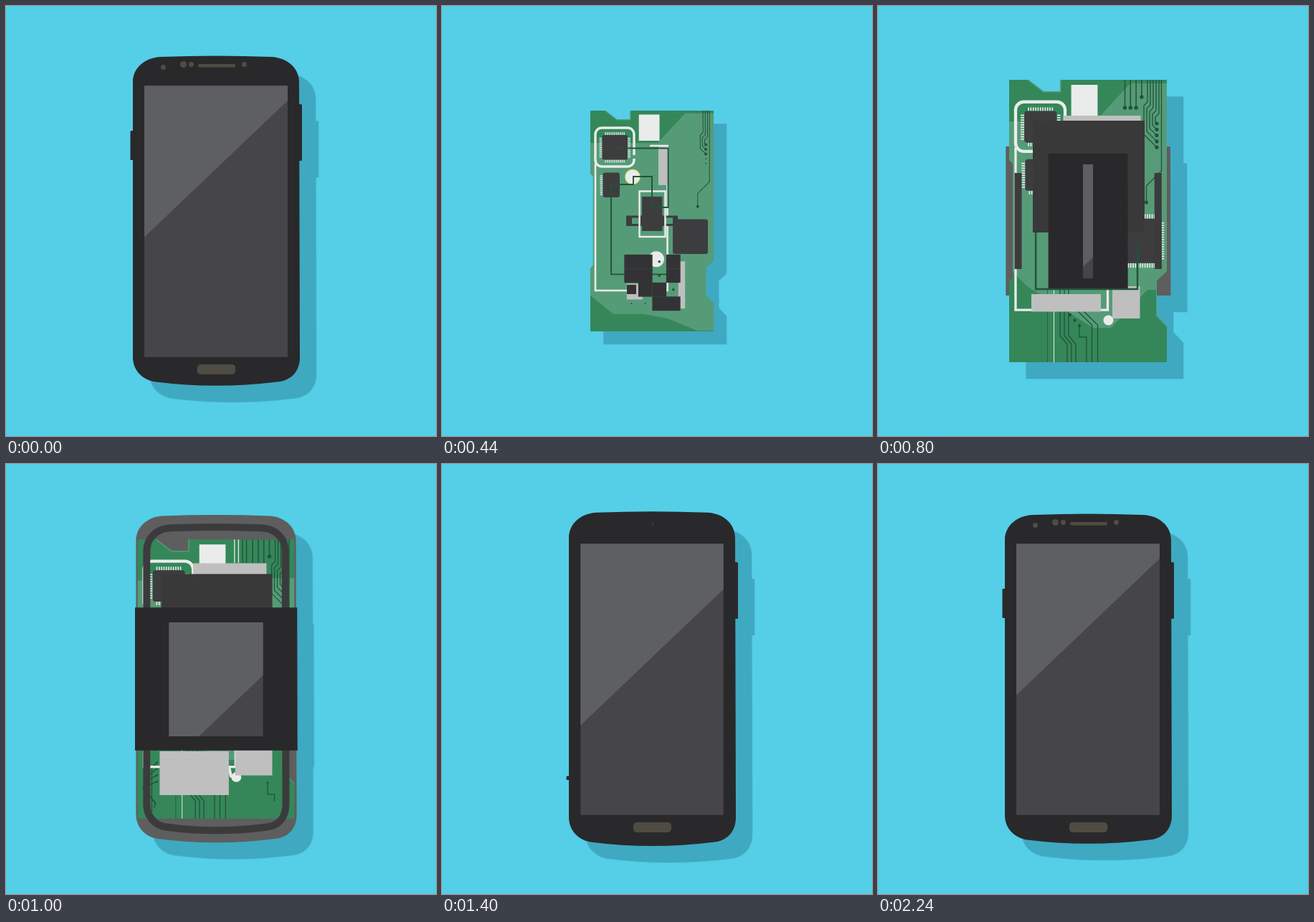
These frames come from a looping animation (600 px wide and 600 px high, 2.28 s). An HTML page with a canvas:

```html
<!DOCTYPE html>
<html lang="en">
<head>
<meta charset="utf-8">
<title>Phone assembly</title>
<style>
html, body { margin: 0; width: 100%; height: 100%; overflow: hidden; background: #54cfe7; }
canvas { display: block; width: 600px; height: 600px; }
</style>
</head>
<body>
<canvas id="stage" width="600" height="600"></canvas>
<script>
const LOOP = 2280, STEP = 40, CX = 293, CY = 300, SMALL = 0.782;
const C = {
  sky: '#54cfe7', shadow: '#3fa9c1', body: '#29292b', glass: '#46464a', shine: '#5e5f61',
  detail: '#4f4c44', shell: '#5e5e5e', ring: '#3b3b3d', board: '#358759', light: '#569b77',
  trace: '#23523a', white: '#e9eceb', grey: '#bfbfbf', chip: '#3d3d3f', tile: '#333335', box: '#393939'
};
const BODY = new Path2D('M177 106C177 86 194 72 216 71Q293 68 370 71C392 72 409 86 409 106' +
  'L410 490C410 510 398 523 378 524.5Q293 535 209 524.5C190 522 177 508 177 490Z');
const BOARD = new Path2D('M183 103h27l21 16h23V103H403V370l-14 13v49l14 15v50H183V385l5-6V220l-5-5Z');
// '#' is a dark tile, 'o' a solder dot
const TILES = ['##o#', '##o#', '.##o', 'oo##'];

const view = document.getElementById('stage').getContext('2d');
const layer = document.createElement('canvas');
layer.width = layer.height = 600;
const g = layer.getContext('2d');

// Timing
const mix = (a, b, u) => a + (b - a) * u;
const span = (t, a, b) => Math.min(1, Math.max(0, (t - a) / (b - a)));
const ease = (t, a, b) => { const u = span(t, a, b); return u * u * (3 - 2 * u); };
const out = (t, a, b, power = 3) => 1 - (1 - span(t, a, b)) ** power;
const back = (t, a, b) => { const v = span(t, a, b) - 1; return 1 + 1.75 * v ** 3 + 0.75 * v * v; };
const spring = (t, a, period) => {
  const s = Math.max(0, t - a) / period;
  return 1 - Math.exp(-2 * s) * Math.cos(2 * Math.PI * s);
};

// Drawing
function rect(color, x, y, w, h, r = 0) {
  if (w <= 0 || h <= 0) return;
  g.fillStyle = color;
  g.beginPath();
  g.roundRect(x, y, w, h, Math.min(r, w / 2, h / 2));
  g.fill();
}
const block = (color, cx, cy, w, h, r) => rect(color, cx - w / 2, cy - h / 2, w, h, r);
function frame(color, width, x, y, w, h, r) {
  g.strokeStyle = color;
  g.lineWidth = width;
  g.beginPath();
  g.roundRect(x, y, w, h, r);
  g.stroke();
}
function dot(color, x, y, r) {
  g.fillStyle = color;
  g.beginPath();
  g.arc(x, y, Math.max(0, r), 0, 7);
  g.fill();
}
function fill(color, path) {
  g.fillStyle = color;
  g.fill(path);
}
function line(color, width, d, length = 2000) {
  if (length <= 0) return;
  g.strokeStyle = color;
  g.lineWidth = width;
  g.setLineDash([length, 2000]);
  g.stroke(new Path2D(d));
  g.setLineDash([]);
}
function scaled(sx, sy, draw) {
  g.save();
  g.translate(CX, CY);
  g.scale(sx, sy);
  g.translate(-CX, -CY);
  draw();
  g.restore();
}
function clipped(x, y, w, h, draw) {
  g.save();
  g.beginPath();
  g.rect(x, y, w, h);
  g.clip();
  draw();
  g.restore();
}
const band = (h, draw) => clipped(0, CY - h / 2, 600, h, draw);
function sizedBody(sx, sy) {
  const path = new Path2D();
  path.addPath(BODY, new DOMMatrix([sx, 0, 0, sy, CX * (1 - sx), CY * (1 - sy)]));
  return path;
}
function chip(x, y, w, h, leg, sides) {
  const gap = 2.6, thick = 1.3;
  for (let p = 4; p < w - 3; p += gap) {
    if (sides.includes('t')) rect(C.white, x + p, y - leg, thick, leg);
    if (sides.includes('b')) rect(C.white, x + p, y + h, thick, leg);
  }
  for (let p = 4; p < h - 3; p += gap) {
    if (sides.includes('l')) rect(C.white, x - leg, y + p, leg, thick);
    if (sides.includes('r')) rect(C.white, x + w, y + p, leg, thick);
  }
  rect(C.chip, x, y, w, h, 3);
}

// Both halves of the housing open as a strip, then unroll up and down.
const stripWidth = (t, extra) => out(t, 720, 1137) * mix(extra, 1, ease(t, 1160, 1400));
const stripHeight = t => 188 + 20 * ease(t, 800, 1160) + 272 * out(t, 1160, 1400);

function shell(t) {
  const w = stripWidth(t + 360, 1.03);
  if (w > 0) band(stripHeight(t + 360), () => fill(C.shell, sizedBody(0.96 * w, 0.993)));
}
function ring(t) {
  band(450 * out(t, 760, 1120), () => {
    g.strokeStyle = C.ring;
    g.lineWidth = 10;
    g.stroke(sizedBody(mix(0.84, 0.829, ease(t, 800, 1160)), 0.92));
  });
}

function base(u, late) {
  const top = 108 + 85 * late, lift = 60 * late;
  const y = (a, b) => mix(a, b, u) - lift;
  g.save();
  fill(C.board, BOARD);
  g.clip(BOARD);
  fill(C.light, new Path2D(`M183 161H303L352 ${top}H403V${y(496, 383)}L${mix(376, 389, u)} ${y(496, 396)}
    H${mix(374, 376, u)}L${mix(321, 325, u)} ${y(474, 449)}L${mix(278, 300, u)} ${y(466, 449)}
    L${mix(224, 208, u)} ${y(466, 391)}L183 ${y(433, 366)}Z`));
  line(C.light, 3, 'M209 102L231 119H254V102');
  line(C.light, 2, 'M403 370l-14 13v49l14 15');
  g.restore();
}

function finePaths(u, late) {
  const fine = (d, length, width = 1.3, color = C.trace) => line(color, width, d, length);
  for (let i = 0; i < 5; i++) {
    const x = 392 - 4 * i, y = 164 + 8.3 * i, p = i < 3 ? 1 : u;
    fine(`M${x} 103V${150 - 4 * i}l-5 5V${y + x - 394}L389 ${y}`, 140 * p);
    dot(C.trace, 389, y, mix(1.2, 2.6, p));
  }
  fine('M395.5 103V230L374.5 251V274');
  dot(C.trace, 374.5, 274, 2.6);
  for (let i = 0; i < 4; i++) {
    const x = 344.5 + 7.8 * i, y = i < 3 ? 142 : 127;
    fine(`M${x} 103V${y}`, 40 * u, 1.5);
    dot(C.trace, x, y, 2.7 * u);
  }

  for (let i = 0; i < 3; i++) {
    fine(`M${254 + 6 * i} 396v64l10 12v25`, 105 * u);
    dot(C.trace, 268 + 6.5 * i, 431 + 7.5 * i, 2.2 * u);
  }
  fine('M281 446v16h10v35', 62 * u);
  for (const x of [279, 287]) fine(`M${x} 426l19.5 19v52`, 80 * u);
  fine('M236.5 396V497', 101 * u, 0.7);
  fine('M245.5 396V497', 101 * u, 1, C.white);

  for (let i = 0; i < 4; i++) {
    const x = 203 - 4 * i, y = 418 + 9 * i;
    fine(`M210 ${y}L${x} ${y + 8}V${470 - 5 * i}l8 8V497`, 110 * late);
    dot(C.trace, 210, y, 2.5 * late);
  }
  for (let x = 319; x < 340; x += 5.6) fine(`M${x} 103V160`, 57 * late, 1.3, x < 326 ? C.white : C.trace);
  fine('M365.5 446v17h9.5v34', 62 * late);
  dot(C.trace, 365.5, 446, 2.4 * late);
  fine('M311 423l3 14l7 3', 28 * late, 4, C.white);
}

// Parts laid out at the size the board has while it grows.
function smallParts(u) {
  frame(C.white, 3.4, 214, 170, 54, 54, 9);
  rect(C.light, 266, 208, 5, 5);
  line(C.white, 2.6, 'M214 220V397H314.5V195H290');
  chip(223.5, 180, 35.5, 34.5, 4, 'tlrb');
  chip(224.5, 232.5, 23.5, 34.5, 4, u > 0.2 ? 'lb' : 'l');

  dot('#d9dc5c', 266, 238.5, 10.8);
  dot(C.white, 266, 238.5, 9.8);
  rect(C.chip, 257, 292.5, 72, 14.5);
  for (const x of [265, 310]) rect(C.light, x, 295.5, 12, 8.5);
  frame(C.white, 2.5, 275.5, 258.5, 36, 63.5, 0);
  rect(C.chip, 279, 266, 28.5, 48);
  chip(322, 297.5, 49, 48.5, 5 * u, 'trbl');
  rect(C.white, 274.7, 151.5, 28.8, 36.5);
}

function plates(u, late) {
  dot(C.white, mix(300.7, 321.5, u), mix(368, 438.5, u), mix(14, 7, u));
  block(C.grey, 312.5, mix(201.5, 168, u) - 28 * late, mix(16, 108, u) - 9 * late, mix(69, 30, u));
  rect(C.grey, mix(340, 327, u) - 12 * late, mix(372, 391, u), mix(12, 38.5, u) + 23 * late, mix(84, 45, u));
  rect(C.grey, mix(248, 214, u), mix(412, 402, u), mix(28, 97, u), mix(28, 24.5, u) + 64 * late);
}

function tiles(s) {
  const pitch = 19.5;
  TILES.forEach((row, j) => [...row].forEach((cell, i) => {
    const x = 254.5 + pitch * (i + 0.5), y = 347 + pitch * (j + 0.5);
    if (cell === '#') block(C.tile, x, y, (pitch + 0.3) * s, (pitch + 0.3) * s);
    if (cell === 'o') dot(C.trace, x, y, (j < 3 ? 1.8 : 1) * s);
  }));
  block(C.tile, 264.5, 395.5, 13 * s, 13 * s);
}

function board(t) {
  const u = ease(t, 440, 800), late = ease(t, 800, 1160), grow = out(t, 240, 742);
  if (grow <= 0) return;
  const unscaled = draw => scaled(1 / SMALL, 1 / SMALL, draw);
  scaled(grow * mix(1, 0.991, late), grow * mix(1, 0.98, late), () => {
    base(u, late);
    finePaths(u, late);
    unscaled(() => smallParts(u));
    plates(u, late);
    unscaled(() => {
      line(C.trace, 1.9, 'M239 198.5H315.5V281H293V238H267V249H236V374.3H347V325', mix(498, 580, ease(t, 440, 740)));
      tiles(1 - ease(t, 440, 620));
    });
    const size = 156 * out(t, 480, 740);
    block(C.box, 294, 238 - 14 * late, size, size);
  });
}

function screen(t) {
  const w = 200 * out(t, 783, 1507), h = mix(159, 378.5, out(t, 1160, 1400));
  const edge = 262 - 130 * out(t, 1160, 1720, 2);
  clipped(CX - w / 2, 300.5 - h / 2, w, h, () => {
    rect(C.glass, 180, 90, 230, 420);
    fill(C.shine, new Path2D(`M193 90H393V${edge}L193 ${edge + 190.5}Z`));
  });
}

function front(t) {
  const w = stripWidth(t, 1.01);
  if (w <= 0) return;
  block(C.body, 409, 176.5, 8, 79 * out(t, 1200, 1400), 1.5);
  const slide = back(t, 1380, 1900);
  block(C.body, 177.5, mix(477, 194.5, slide), 8, 41 * slide, 1.5);

  const stretch = 1 + 0.014 * Math.sin(Math.PI * span(t, 1160, 1640));
  band(stripHeight(t), () => fill(C.body, sizedBody(w, stretch)));
  screen(t);

  block(C.detail, 293.5, 507, 53 * spring(t, 1300, 400), 14, 5);
  block(C.detail, 294, 83.2, 52 * spring(t, 1398, 217), 4.5, 2.2);
  const lens = back(t, 1460, 1700);
  dot(C.detail, 219.5, 85.5, 3.5 * lens);
  dot(C.detail, 247.5, 81.5, 4.5 * lens);
  for (const x of [258.5, 332.5]) dot(C.detail, x, 81.5, 3.5 * lens);
}

function render(t) {
  g.clearRect(0, 0, 600, 600);
  const leave = 1 - span(t, 0, 240) ** 2;
  if (leave > 0) {
    scaled(leave, leave, () => front(LOOP));
  } else {
    if (t < 1400) {
      shell(t);
      board(t);
      ring(t);
    }
    front(t);
  }
  view.shadowColor = 'transparent';
  view.fillStyle = C.sky;
  view.fillRect(0, 0, 600, 600);
  view.shadowColor = C.shadow;
  view.shadowOffsetX = view.shadowOffsetY = 23.3 * (leave || out(t, 240, 742));
  view.drawImage(layer, 0, 0);
}

const start = performance.now();
function tick() {
  const t = (performance.now() - start) % LOOP;
  render(Math.floor(t / STEP) * STEP);
  requestAnimationFrame(tick);
}
tick();
</script>
</body>
</html>
```
